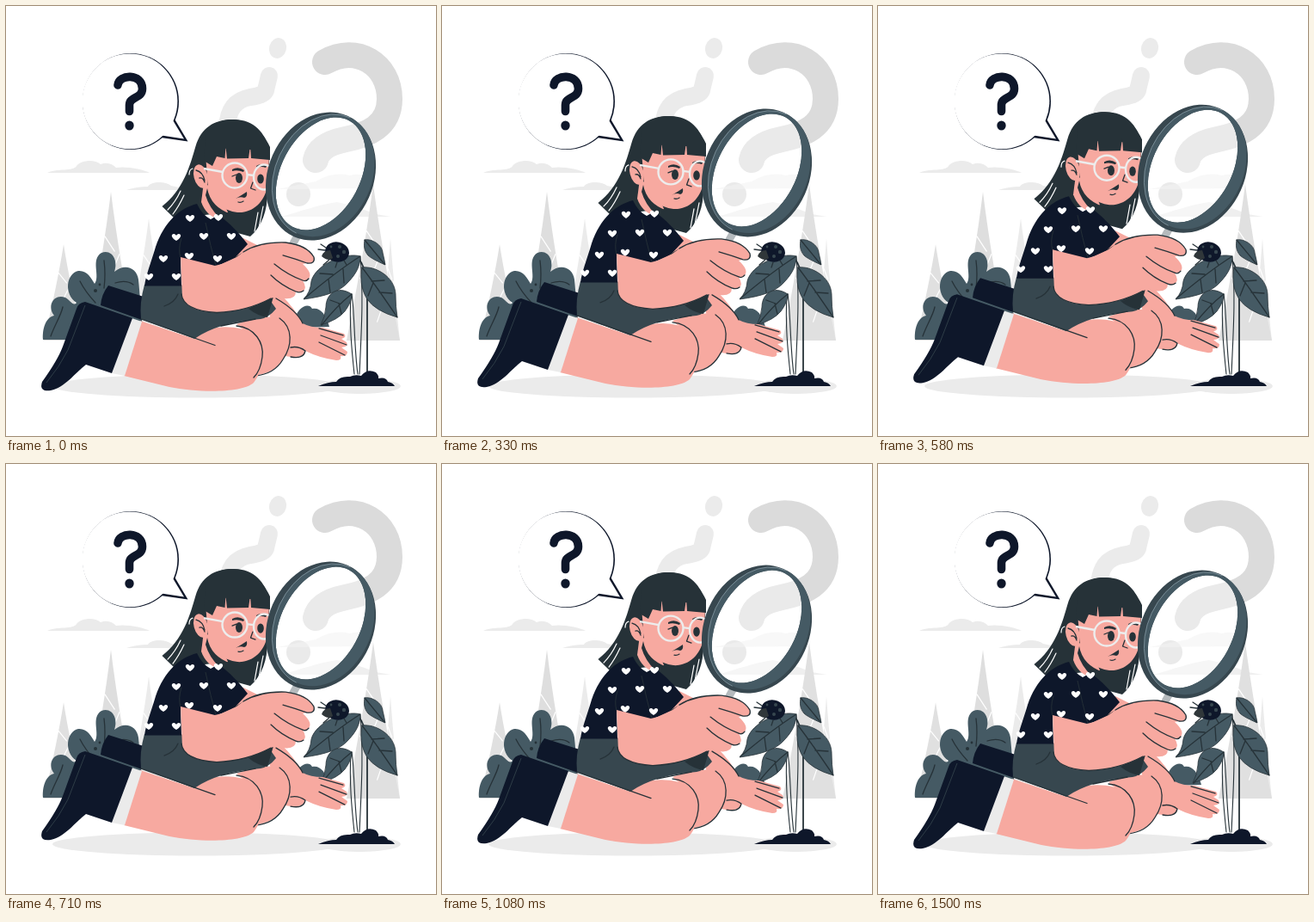
An HTML page for the animation above (1.54 s loop, 500 by 500 pixels).

```html
<!DOCTYPE html>
<html lang="en">
<head>
<meta charset="utf-8">
<title>Curious girl with a magnifier</title>
<style>
html, body { margin: 0; width: 100%; height: 100%; overflow: hidden; background: #fff; }
svg { display: block; width: 100%; height: 100%; }
.line { fill: none; stroke: #263238; stroke-width: 1.3; stroke-linecap: round; stroke-linejoin: round; }
.white { fill: none; stroke: #fff; stroke-width: 1.2; stroke-linecap: round; }
.skin { fill: #f7a9a0; }
.navy { fill: #0e172a; }
.hair { fill: #263238; }
.slate { fill: #37474f; }
.leaf { fill: #455a64; }
.mark { fill: none; stroke-linecap: round; }
</style>
</head>
<body>
<svg viewBox="0 0 500 500">
  <!-- sky -->
  <g class="mark">
    <path d="M306 81L302 98Q300 104 284 106C268 109 258 118 257 142" stroke="#ebebeb" stroke-width="20"/>
    <path d="M371 65C408 44 446 68 446 108C446 140 420 150 395 155C370 160 362 170 360 179" stroke="#dbdbdb" stroke-width="30"/>
  </g>
  <ellipse cx="316" cy="49" rx="10" ry="12" fill="#ebebeb" transform="rotate(15 316 49)"/>
  <circle cx="340" cy="219" r="14" fill="#dbdbdb"/>
  <g fill="#ebebeb">
    <path d="M48 194C60 188 78 193 82 186C88 179 103 178 110 184C118 181 124 184 128 188C140 186 160 190 167 194Z"/>
    <path d="M140 214Q152 210 165 210C168 204 185 203 192 209L215 214Z"/>
    <path d="M315 213Q345 207 360 204Q380 192 400 197Q415 193 420 202L420 212Z" opacity=".6"/>
    <path d="M320 245C345 238 360 232 385 228Q405 232 430 242L447 245Z" opacity=".8"/>
  </g>
  <g id="trees"></g>

  <!-- ground and bushes -->
  <g fill="#ebebeb">
    <ellipse cx="222" cy="442" rx="168" ry="13.5"/>
    <ellipse cx="411" cy="442" rx="48" ry="9"/>
  </g>
  <g class="leaf">
    <path d="M43 388C42 376 46 362 56 360C47 348 56 334 69 339C75 342 78 350 82 345C67 335 70 311 84 308C94 307 99 316 103 323C110 314 98 295 111 287C123 282 131 296 126 309C138 299 152 304 154 318L160 388Z"/>
    <path d="M335 367C338 350 352 344 356 352C365 350 372 358 376 373L345 374Z"/>
  </g>
  <path class="line" d="M52 384C56 372 64 360 66 350M86 320Q92 332 104 345M114 296Q116 312 114 328M127 322Q140 318 148 324" stroke-width="1"/>
  <g class="hair"><circle cx="104" cy="331" r="2"/><circle cx="109" cy="324" r="1.4"/></g>

  <!-- plant -->
  <g class="line">
    <path d="M420 430V345C420 308 415 292 402 291" stroke-width="1.8"/>
    <path d="M412 292C416 340 413 380 411 428M402 335C405 350 405 400 409 428M401 336C399 370 402 400 405 428" stroke-width="1.1"/>
  </g>
  <g class="leaf" stroke="#263238" stroke-width=".8">
    <path d="M412 291C395 286 360 300 355 320Q354 333 346 341Q385 336 397 322C408 311 412 301 412 291Z"/>
    <path d="M417 272C425 270 438 278 438 287Q440 295 441 301Q425 294 421 290C416 284 416 278 417 272Z"/>
    <path d="M414 304C430 302 452 315 453 335Q453 350 455 362Q430 355 420 341C412 328 412 315 414 304Z"/>
    <path d="M402 335C385 324 372 335 372 350Q371 362 366 371Q386 365 394 355C399 348 402 342 402 335Z"/>
  </g>
  <path class="line" stroke-width=".9" d="M412 291Q385 308 347 340M417 272L440 300M414 304Q430 325 455 362M402 335Q385 348 367 371M392 306L393 322M375 318L377 333M380 312L365 311M425 320L440 319M434 333L449 334M427 322L421 337M387 346L390 358M388 346L377 342"/>
  <path class="navy" d="M363 442Q375 437 384 437Q388 430 400 431Q406 428 413 430Q420 421 430 426Q434 430 433 433Q442 431 444 437Q450 438 452 442Z"/>
  <path class="line" stroke-width="1" d="M372 281L366 277M371 284L363 283M376 295L369 301M385 298L383 304M393 296L396 301"/>
  <ellipse class="navy" cx="385" cy="286" rx="14" ry="11.5" transform="rotate(12 385 286)"/>
  <path d="M367 291Q369 284 377 284L380 293Q375 298 367 291Z" fill="#30373a"/>
  <g class="slate"><circle cx="388" cy="280" r="2"/><circle cx="393" cy="286" r="2.2"/><circle cx="386" cy="291" r="2"/><circle cx="378" cy="280" r="1.4"/></g>

  <!-- speech bubble -->
  <circle class="navy" cx="145" cy="111" r="56"/>
  <path class="navy" d="M194 128L211.5 157.5L180 153Z"/>
  <circle cx="144" cy="110.8" r="55.4" fill="#fff"/>
  <path d="M190 128L193.5 132L207 154.6L181 150.5L170 150Z" fill="#fff"/>
  <path class="mark" d="M130 92C131 79 158.500 78 158.500 96C158.500 108 143.500 105 143.500 115V122.500" stroke="#0e172a" stroke-width="9.600"/>
  <ellipse class="navy" cx="143.500" cy="139" rx="5.200" ry="5.500"/>

  <!-- floating girl -->
  <g id="girl">
    <path class="navy" d="M119 325L160 338L158 365L110 348Q111 335 119 325Z"/>
    <path class="skin" d="M302 340L320 336Q336 352 345 369Q354 374 368 374L393 381Q397 385 390 387L396 391Q399 396 390 397L397 402Q397 408 389 407Q391 412 384 412Q364 409 348 401Q349 409 331 408L318 406Z"/>
    <path class="line" d="M314 340Q338 354 345 369M364 375L392 383M366 383L396 394M364 391L394 406M348 401Q340 395 331 397M331 408Q346 411 348 401"/>
    <path class="skin" d="M268 370Q300 358 318 363C334 372 334 395 322 411Q312 428 286 430L298 395Z"/>
    <path class="line" d="M318 363C334 374 333 395 322 411Q312 428 290 430"/>
    <path class="skin" d="M156 366L219 387C230 370 270 369 290 382C302 395 302 420 288 438C275 450 225 450 190 443L137 430Z"/>
    <path class="slate" d="M161 324H204L215 335L300 332L314 352Q306 362 296 364Q246 368 219 387L157 364Q155 345 161 324Z"/>
    <path class="hair" d="M282 352L311 338L304 362Q292 360 282 352Z"/>
    <path class="line" d="M157 364L243 394.500M268 372C290 374 300 392 298 408Q296 424 288 432M184 349Q196 345 200 335M250 372Q270 368 290 364"/>
    <path d="M146 363L158 367L138 430L123 427Z" fill="#ebebeb"/>
    <path class="navy" d="M92 344L147 363L123 427L93 417C80 427 68 444 52 447Q38 449 42 437Q60 412 66 396L82 352Q84 345 92 344Z"/>
    <path d="M92 348L72 400Q62 420 47 438" fill="none" stroke="#37474f" stroke-width=".8"/>

    <!-- head -->
    <path class="hair" d="M264 132C241 132 227 142 220.500 163C214 186 206 214 181.500 233L196 247L240 242L262 262L284 268C298 256 304 237 304 217L307 166C300 148 290 132 264 132Z"/>
    <path class="white" d="M203 215Q197 228 188 237M207 220Q201 233 194 242M299 233L294 258M293 240L289 262"/>
    <path class="skin" d="M230 205L227 228Q233 244 246 247L258 240L250 220Z"/>
    <path class="hair" d="M234 212Q238 234 262 242L248 246Q236 234 232 220Z"/>
    <path class="skin" d="M232 172L235 212C240 230 258 241 274 240C290 238 302 226 305 205L306 168L240 165Z"/>
    <ellipse class="skin" cx="226.500" cy="198" rx="8" ry="14" transform="rotate(-14 226.500 198)"/>
    <path class="line" d="M221 191Q229 193 231 203M225 200Q229 199 231 205"/>
    <path class="hair" d="M232 150L230 180L240 186L245 175L254.500 177L255.500 164L257 177.500L282 177L284 163L285 177L307 179V164C298 144 280 132 264 132C246 132 234 140 232 150Z"/>
    <g class="hair">
      <ellipse cx="271" cy="200" rx="4" ry="6"/>
      <ellipse cx="296" cy="201" rx="3.800" ry="5.600"/>
      <path d="M263 190Q270 186 277 191L276 193Q269 190 263 192Z"/>
      <path d="M291 186Q297 182 303 186L302 188Q297 186 292 188Z"/>
      <path d="M267 224Q274 220 280 216Q281 222 277 223Q272 221 267 224Z"/>
    </g>
    <path class="line" d="M263 198L268 196M287 205L284.500 212L290 214M270 228Q273 229 276 227"/>
    <g fill="none" stroke="#ededed" stroke-width="2.400">
      <circle cx="266" cy="197" r="14.500"/>
      <ellipse cx="300" cy="199" rx="12" ry="14.500"/>
      <path d="M252 193L230 189M280 196L288 197"/>
    </g>
    <path class="white" d="M213 196Q213 190 217 189" stroke-width="1.600"/>

    <!-- torso and arm -->
    <path class="skin" d="M260 280L276 270L292 278L275 302L250 302Z"/>
    <path class="navy" d="M222 230C202 235 184 251 174 280C168 300 163 312 161 325.500H204L203 293L244 303L266 293L281 277C272 265 260 252 247 243L238 248Q228 243 222 230Z"/>
    <path d="M204 270Q200 282 203 293M232 252Q238 280 244 302" fill="none" stroke="#263238" stroke-width=".9"/>
    <path class="line" d="M266 293L284 282"/>
    <g id="hearts" fill="#fff"></g>
    <path d="M347 262L339 258L322 288L331 290Z" fill="#b5babd"/>
    <path class="skin" d="M203 292L243 302Q262 298 276 286Q295 274 325 275Q350 278 358 292Q360 300 350 299L345 300Q357 311 352 317Q349 321 345 319Q350 328 346 331Q342 334 337 332Q337 342 322 340Q312 337 306 341Q280 355 245 356.500Q212 355 205 340Z"/>
    <path class="line" d="M276 286Q295 274 325 275Q350 278 358 292Q360 300 350 299Q336 294 322 290M352 317Q349 321 345 319Q328 313 312 300M346 331Q342 334 337 332Q320 325 308 313M204 335Q206 354 245 356.500Q280 355 308 340"/>

    <!-- magnifier -->
    <path d="M398.900 133.200a46 70 28 1 0-65.800 123.600a46 70 28 1 0 65.800-123.600" fill="#fff" fill-opacity=".4"/>
    <g fill-rule="evenodd">
      <path class="slate" d="M397.200 127.800a61.200 76.800 24 1 0-62.400 140.400a61.200 76.800 24 1 0 62.400-140.400M398.900 133.200a46 70 28 1 0-65.800 123.600a46 70 28 1 0 65.800-123.600"/>
      <path class="leaf" d="M400.300 129.900a56 74 25 1 0-62.600 134.200a56 74 25 1 0 62.600-134.200M398.900 133.200a46 70 28 1 0-65.800 123.600a46 70 28 1 0 65.800-123.600"/>
    </g>
    <path d="M400.300 129.900a56 74 25 0 0-62.600 134.200" fill="none" stroke="#90a4ae" stroke-width=".7"/>
  </g>
</svg>
<script>
const $ = id => document.getElementById(id);

const tree = (x, top, half, color) => {
  const h = 389 - top, at = (dx, k) => `${x + dx * half} ${top + h * k}`;
  return `<path fill="${color}" d="M${at(0, 0)}Q${at(.3, .4)} ${at(1, 1)}H${x - half}Q${at(-.3, .4)} ${at(0, 0)}Z"/>
    <path class="white" stroke-width=".8" d="M${at(-.25, .3)}L${at(.15, .4)}M${at(.35, .42)}L${at(0, .56)}M${at(-.5, .6)}L${at(0, .73)}M${at(.55, .68)}L${at(.15, .88)}"/>`;
};
$('trees').innerHTML = [
  [166, 247, 24, '#ebebeb'], [122, 216, 28, '#dedede'], [67, 277, 23, '#e0e0e0'],
  [447, 270, 11, '#ebebeb'], [427, 207, 31, '#e0e0e0']
].map(t => tree(...t)).join('');

$('hearts').innerHTML = [
  [214, 247], [247, 246], [262, 268], [198, 269], [230, 268],
  [213, 291], [183, 294], [246, 294], [166, 315], [198, 315]
].map(([x, y]) => `<path d="M${x} ${y + 4}C${x - 10} ${y - 2} ${x - 3} ${y - 7} ${x} ${y - 2}C${x + 3} ${y - 7} ${x + 10} ${y - 2} ${x} ${y + 4}Z"/>`).join('');

// Float 10px up and back in 1.5 s, easing at both ends.
function draw(now) {
  const rise = 5 * (1 - Math.cos(2 * Math.PI * (now % 1540) / 1500));
  $('girl').setAttribute('transform', `translate(0 ${-rise})`);
  requestAnimationFrame(draw);
}
draw(performance.now());
</script>
</body>
</html>
```
